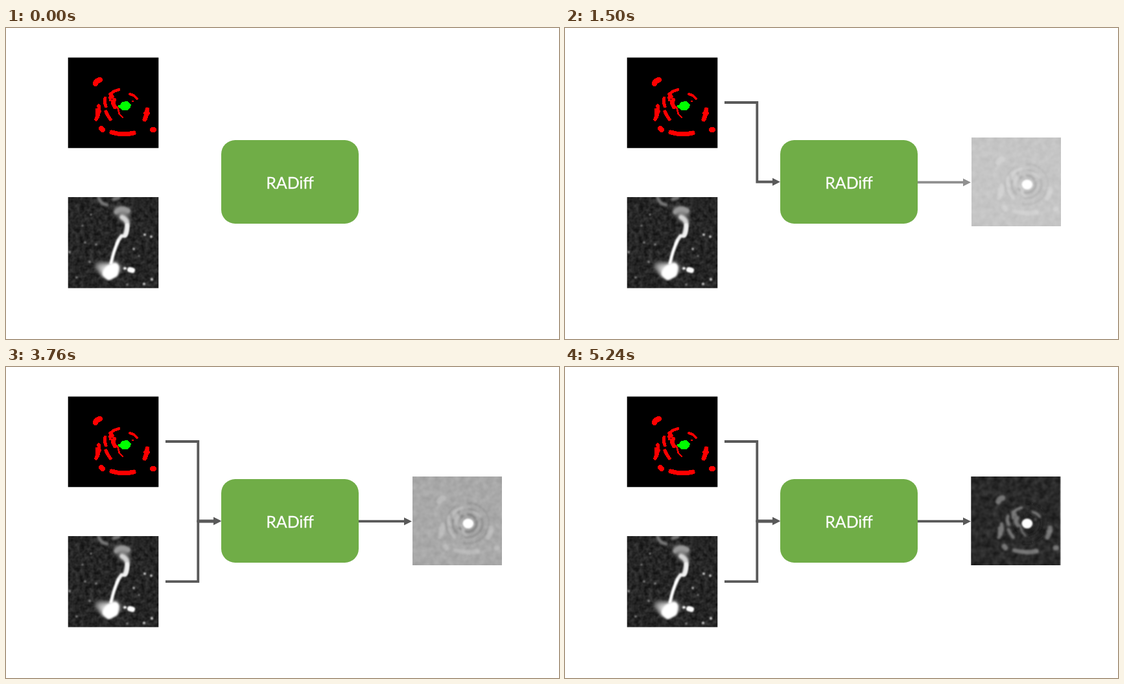
An HTML page that plays this animation: 853 by 480 pixels, repeating every 8.32 s.

```html
<!DOCTYPE html>
<html lang="en">
<head>
<meta charset="utf-8">
<title>RADiff</title>
<style>
  html, body { margin: 0; width: 100%; height: 100%; overflow: hidden; background: #fff; }
  svg { display: block; width: 100vw; height: 100vh; }
  text { font: 24.9px Lato, Carlito, sans-serif; fill: #fff; stroke: #fff; stroke-width: .3; text-anchor: middle; }
  .line { fill: none; stroke: #595959; stroke-width: 3.8; }
  .head { fill: #595959; }
  .soft { fill: none; stroke-linecap: round; stroke-linejoin: round; }
</style>
</head>
<body>
<svg viewBox="0 0 853 480" xmlns="http://www.w3.org/2000/svg">
  <defs>
    <filter id="skyGrain" x="0" y="0" width="1" height="1" color-interpolation-filters="sRGB">
      <feTurbulence type="fractalNoise" baseFrequency=".14" numOctaves="2" seed="4"/>
      <feColorMatrix values=".24 0 0 0 .025  .24 0 0 0 .025  .24 0 0 0 .025  0 0 0 0 1"/>
    </filter>
    <filter id="darkGrain" x="0" y="0" width="1" height="1" color-interpolation-filters="sRGB">
      <feTurbulence type="fractalNoise" baseFrequency=".1" numOctaves="2" seed="9"/>
      <feColorMatrix values=".2 0 0 0 .06  .2 0 0 0 .06  .2 0 0 0 .06  0 0 0 0 1"/>
    </filter>
    <filter id="greyGrain" x="0" y="0" width="1" height="1" color-interpolation-filters="sRGB">
      <feTurbulence type="fractalNoise" baseFrequency=".1" numOctaves="2" seed="9"/>
      <feColorMatrix values=".11 0 0 0 .605  .11 0 0 0 .605  .11 0 0 0 .605  0 0 0 0 1"/>
    </filter>
    <filter id="blur1" filterUnits="userSpaceOnUse" x="0" y="0" width="853" height="480"><feGaussianBlur stdDeviation=".9"/></filter>
    <filter id="blur2" filterUnits="userSpaceOnUse" x="0" y="0" width="853" height="480"><feGaussianBlur stdDeviation="1.7"/></filter>
    <filter id="blur4" filterUnits="userSpaceOnUse" x="0" y="0" width="853" height="480"><feGaussianBlur stdDeviation="3"/></filter>
    <clipPath id="inputClip"><rect x="95.7" y="261" width="139.6" height="140.4"/></clipPath>
    <clipPath id="outputClip"><rect x="627" y="169" width="138" height="137"/></clipPath>
    <clipPath id="finalClip"><rect x="626.3" y="169" width="137.4" height="137"/></clipPath>
    <g id="marks" class="soft"></g>
    <g id="rings" class="soft"></g>
  </defs>

  <rect width="853" height="480" fill="#fff"/>

  <!-- segmentation mask -->
  <rect x="95.7" y="45.6" width="139.6" height="139.7" fill="#000"/>
  <g shape-rendering="crispEdges">
    <use href="#marks" stroke="#f00"/>
    <path d="M173 119H176L179 114L187 113L190 116L193 119L191 124L187 127H180L176 124L173 122Z" fill="#0f0"/>
  </g>

  <!-- sky image -->
  <g clip-path="url(#inputClip)">
    <rect x="95" y="261" width="141" height="141" filter="url(#skyGrain)"/>
    <g class="soft" filter="url(#blur4)">
      <path d="M172 281L187 283M178 290L186 297" stroke="#858585" stroke-width="11"/>
      <path d="M146 369L154 370" stroke="#a0a0a0" stroke-width="15"/>
      <path d="M156 376L166 371" stroke="#ddd" stroke-width="20"/>
    </g>
    <g class="soft" filter="url(#blur2)">
      <path d="M143 262Q146 272 156 273M166 264L174 262" stroke="#777" stroke-width="5"/>
      <path d="M170 284Q177 276 188 282" stroke="#999" stroke-width="7"/>
      <path d="M179 292Q188 296 187 306L184 318" stroke="#d4d4d4" stroke-width="7"/>
      <path d="M155 379Q157 371 168 369L167 379L159 383Z" stroke="#fff" stroke-width="12" fill="#fff"/>
    </g>
    <g class="soft" filter="url(#blur1)">
      <path d="M187 304Q188 314 184 321L178 321Q173 327 171 333" stroke="#f2f2f2" stroke-width="5.5"/>
      <path d="M162 363Q166 344 173 329" stroke="#fff" stroke-width="5"/>
      <path d="M191 373L195 374" stroke="#fff" stroke-width="8"/>
      <path d="M183 371h1" stroke="#fff" stroke-width="4"/>
      <g id="stars" fill="#fff"></g>
    </g>
  </g>

  <!-- input connectors -->
  <g id="topLink">
    <path class="line" d="M246 115H296.3V237.5H322"/>
    <path class="head" d="M320 231.5L332 237.5L320 243.5Z"/>
  </g>
  <g id="lowLink">
    <path class="line" d="M246 331.2H296.3V238.5H322"/>
    <path class="head" d="M320 232L332 238L320 244Z"/>
  </g>

  <rect x="332" y="173" width="212" height="129" rx="21.5" fill="#70ad47"/>
  <text x="438.1" y="248">RADiff</text>

  <!-- generated result -->
  <g id="result">
    <path class="line" d="M544 238.2H616"/>
    <path class="head" d="M614 232.2L626 238.2L614 244.2Z"/>
    <g clip-path="url(#outputClip)">
      <rect x="627" y="169" width="138" height="137" filter="url(#greyGrain)"/>
      <g filter="url(#blur2)">
        <use href="#rings" stroke="#707070" opacity=".7"/>
        <use href="#marks" x="530.3" y="122" stroke="#cfcfcf" opacity=".5"/>
      </g>
      <g filter="url(#blur1)">
        <ellipse cx="712.8" cy="241.6" rx="8.4" ry="7.6" fill="#fff"/>
      </g>
    </g>
  </g>
  <g id="final" clip-path="url(#finalClip)">
    <rect x="626" y="169" width="138" height="137" filter="url(#darkGrain)"/>
    <g filter="url(#blur2)">
      <use href="#rings" stroke="#161616" opacity=".6"/>
      <use href="#marks" x="530.3" y="122" stroke="#a8a8a8" opacity=".62"/>
    </g>
    <g filter="url(#blur1)">
      <ellipse cx="712.8" cy="241.6" rx="8.4" ry="7.6" fill="#fff"/>
    </g>
  </g>
</svg>
<script>
const LOOP = 8320, STEP = 60;
const $ = id => document.getElementById(id);

function add(parent, tag, attrs) {
  const el = document.createElementNS("http://www.w3.org/2000/svg", tag);
  for (const key in attrs) el.setAttribute(key, attrs[key]);
  parent.appendChild(el);
}

// Path and stroke width of each mask fragment
const marks = [
  ["M138 86L140 82L145 80", 8.5],
  ["M161 111Q159 103 166 98L174 95", 4.5],
  ["M161 102L164 106", 5.5],
  ["M191 102L197 104L202 109", 4],
  ["M195 113h1", 2],
  ["M153 108L152 114L154 121", 5],
  ["M143 120L144 129L139 141", 5.5],
  ["M141 127L141 136", 7],
  ["M154 129L157 135L161 141", 5],
  ["M167 111L165 116L168 122", 6.5],
  ["M172 122L175 133L180 138", 2.6],
  ["M163 161Q180 166 197 162", 7],
  ["M147 155L149 157", 8],
  ["M218 126L217 133L214 141", 7],
  ["M216 132L218 131", 7.5],
  ["M226 157H228", 8]
];
marks.forEach(([d, w]) => add($("marks"), "path", { d, "stroke-width": w }));

// Dark troughs between the bright arcs
for (const [r, w] of [[14, 4], [23, 3], [33, 2.5]])
  add($("rings"), "ellipse", { cx: 712, cy: 241, rx: r, ry: r * .95, "stroke-width": w,
    "stroke-dasharray": `${r * 1.7} ${r * .6}`, opacity: 18 / (r + 6) });

const stars = [
  [214, 319, 2], [224, 322, 2], [225, 388, 2.2], [213, 395, 2], [197, 341, 1.8],
  [122, 331, 1.8], [131, 288, 1.6], [129, 361, 1.8], [139, 334, 1.5], [109, 385, 1.6],
  [98, 346, 2], [187, 396, 1.7], [205, 352, 1.4], [118, 305, 1.3]
];
stars.forEach(([cx, cy, r], i) =>
  add($("stars"), "circle", { cx, cy, r, opacity: i < 5 ? .75 : .5 }));

function fade(t, start, steps) {
  const k = Math.floor((t - start) / STEP + .001);
  return Math.max(0, Math.min(1, k / steps));
}

function draw(t) {
  const show = (id, start, steps) => $(id).setAttribute("opacity", fade(t, start, steps));
  show("topLink", 60, 15);
  show("result", 900, 15);
  show("lowLink", 2800, 15);
  show("final", 4760, 7.5);
}

function tick() {
  draw(performance.now() % LOOP);
  requestAnimationFrame(tick);
}
tick();
</script>
</body>
</html>
```
